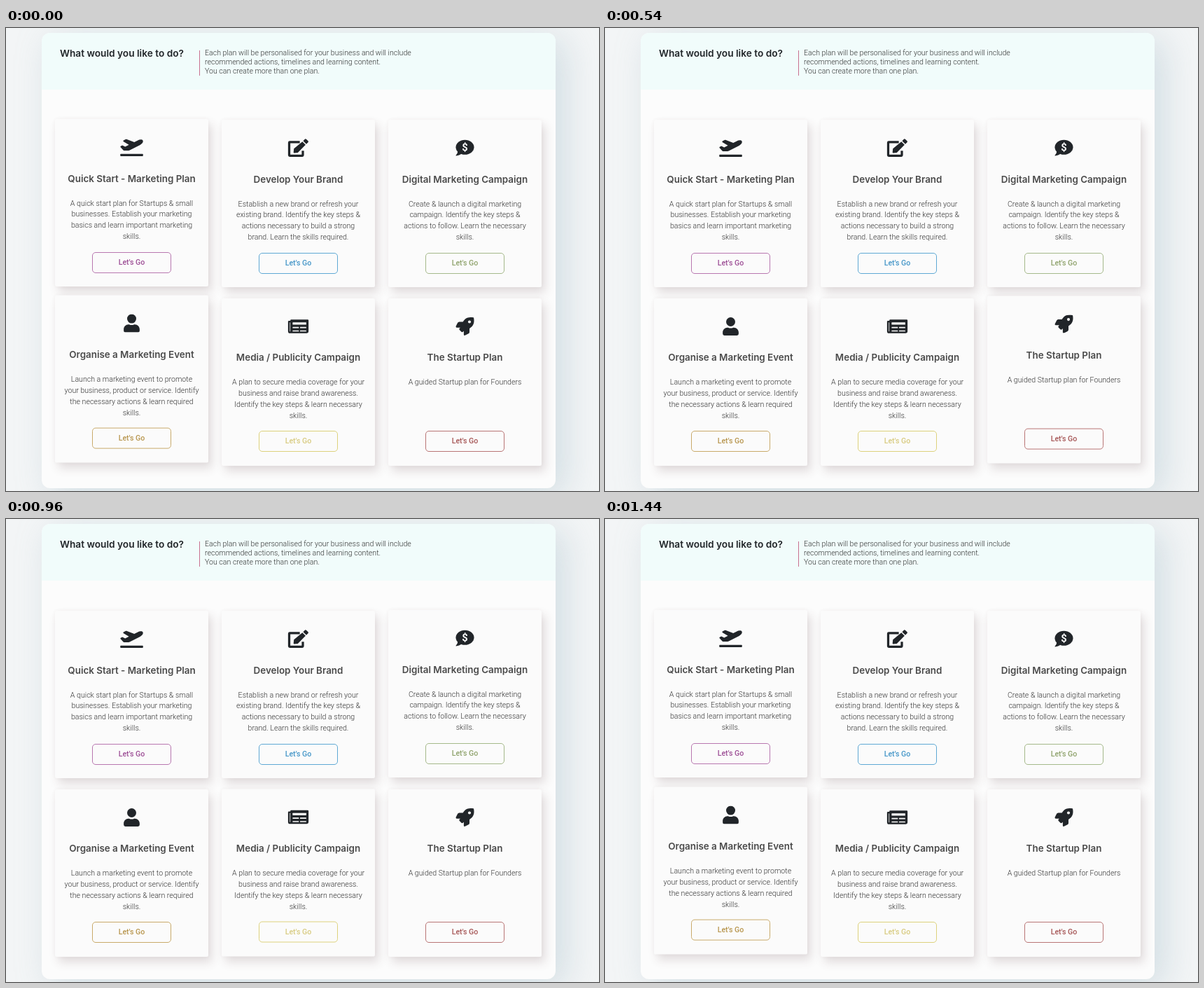
An HTML page that plays this animation: 847x661 px, repeating every 1.5 s.

```html
<!DOCTYPE html>
<html lang="en">
<head>
<meta charset="utf-8">
<title>Plan picker</title>
<style>
  html, body { margin: 0; width: 100%; height: 100%; overflow: hidden; }
  body { position: relative; background: #f3f5f6; font: 300 10.6px Roboto, sans-serif; color: #333; }
  .panel, .panel > *, .card, .card > * { position: absolute; box-sizing: border-box; }
  .panel { left: 51px; top: 7px; width: 734px; height: 650px; border-radius: 12px; background: #fcfcfc;
    box-shadow: 14px 10px 50px rgba(150, 180, 195, .36); }
  .top { width: 100%; height: 81px; border-radius: 12px 12px 0 0; background: #f1fcfb; }
  h1, h2 { margin: 0; font: 600 13.7px/18px Inter, sans-serif; white-space: nowrap; }
  h1 { left: 26px; top: 20px; color: #212529; }
  .intro { left: 225px; top: 25px; height: 36px; border-left: 1px solid #c8718f; }
  .intro p { margin: -3px 0 0 7px; line-height: 13.2px; white-space: pre; }
  .card { width: 219px; height: 239px; border-radius: 2px; background: #fbfbfb;
    box-shadow: 5px 8px 14px rgba(90, 55, 65, .16), 0 0 5px rgba(90, 55, 65, .05); }
  .card > * { left: 0; width: 100%; text-align: center; }
  .card svg { top: 27px; height: 26px; fill: #212529; }
  .card h2 { top: 75.5px; font-size: 13.4px; color: #4a4a4a; }
  .card p { top: 112.5px; margin: 0; line-height: 15.9px; white-space: pre; }
  .card b { left: 53px; top: 189.5px; width: 113px; height: 30px; border: 1px solid; border-radius: 5px;
    font-weight: 500; line-height: 28px; }
</style>
</head>
<body>
<div class="panel">
  <div class="top"></div>
  <h1>What would you like to do?</h1>
  <div class="intro"><p>Each plan will be personalised for your business and will include
recommended actions, timelines and learning content.
You can create more than one plan.</p></div>
</div>
<script>
const LOOP = 1500, STEP = 60, PAPER = '#fbfbfb';
const hole = (x, y, w, h) => `<rect x="${x}" y="${y}" width="${w}" height="${h}" rx="10" fill="${PAPER}"/>`;

const icons = {
  plane: [640, `<rect y="448" width="640" height="64" rx="16"/><path d="M80 341q10 11 24 11h131q16 0 30-7L556 197
    c60-30 95-85 80-122-20-40-90-35-144-8l-99 50L174 35q-9-5-18-1L90 67q-14 10-5 29l157 98-104 52-72-36q-8-4-16 0L10 230q-11 8-6 28z"/>`],
  edit: [576, `<path d="M330 96H48q-16 0-16 16V464q0 16 16 16H400q16 0 16-16V340" fill="none" stroke="#212529" stroke-width="64"/>
    <path d="M402 84l90 90L274 392l-100 11q-22 0-20-20l11-100zM424 62l48-49q20-18 40 0l51 51q18 20 0 40l-49 48z"/>`],
  comment: [512, `<ellipse cx="256" cy="240" rx="256" ry="208"/><path d="M60 340Q50 420 2 468q-6 12 6 12 90-2 150-50z"/>
    <text x="256" y="342" text-anchor="middle" font-size="290" font-weight="700" fill="${PAPER}">$</text>`],
  user: [448, `<circle cx="224" cy="128" r="128"/><path d="M314 288h-17q-73 33-146 0h-17C60 288 0 348 0 422v42
    q0 48 48 48h352q48 0 48-48v-42c0-74-60-134-134-134z"/>`],
  news: [576, `<path d="M552 64H88q-24 0-24 24v8H24q-24 0-24 24v272q0 56 56 56h472q48 0 48-48V88q0-24-24-24z"/>`
    + hole(48, 144, 16, 256) + hole(128, 144, 384, 64)
    + [272, 368].map(y => hole(128, y, 176, 32) + hole(336, y, 176, 32)).join('')],
  rocket: [512, `<path d="M505 19q-3-9-12-12C461 0 435 0 410 0 307 0 245 55 199 128H95q-28 2-43 26L3 253q-9 30 21 35h104l-23 22
    q-18 23 0 46l51 51q23 18 45 0l23-23v104q4 30 35 21l99-49q24-14 26-42V313c72-46 128-109 128-211 0-26 0-51-7-83z"/>
    <circle cx="384" cy="128" r="40" fill="${PAPER}"/>`]
};

// lift: [time, pixels] points, linear between them
const cards = [
  { icon: 'plane', title: 'Quick Start - Marketing Plan', ink: '#9d4f96', line: '#b877b0',
    text: 'A quick start plan for Startups & small\nbusinesses. Establish your marketing\nbasics and learn important marketing\nskills.',
    lift: [[0, 1], [180, 0], [1300, 0], [1440, 1], [1500, 1]] },
  { icon: 'edit', title: 'Develop Your Brand', ink: '#4596c8', line: '#5fa9d4',
    text: 'Establish a new brand or refresh your\nexisting brand. Identify the key steps &\nactions necessary to build a strong\nbrand. Learn the skills required.',
    lift: [[0, 0], [1500, 0]] },
  { icon: 'comment', title: 'Digital Marketing Campaign', ink: '#8fa36c', line: '#a5b98a',
    text: 'Create & launch a digital marketing\ncampaign. Identify the key steps &\nactions to follow. Learn the necessary\nskills.',
    lift: [[0, 0], [600, 0], [720, 1], [840, 1.8], [960, 1], [1080, 0], [1500, 0]] },
  { icon: 'user', title: 'Organise a Marketing Event', ink: '#b8964e', line: '#c9aa6a',
    text: 'Launch a marketing event to promote\nyour business, product or service. Identify\nthe necessary actions & learn required\nskills.',
    lift: [[0, 4.4], [60, 4.2], [240, 0], [1080, 0], [1260, 1.7], [1440, 3.4], [1500, 4.4]] },
  { icon: 'news', title: 'Media / Publicity Campaign', ink: '#d8cb80', line: '#ddd27c',
    text: 'A plan to secure media coverage for your\nbusiness and raise brand awareness.\nIdentify the key steps & learn necessary\nskills.',
    lift: [[0, 0], [60, 0], [240, 2.8], [300, 2.5], [480, 0], [900, 0], [960, .5], [1110, 2], [1260, .7], [1380, 0], [1500, 0]] },
  { icon: 'rocket', title: 'The Startup Plan', ink: '#a65656', line: '#b97575',
    text: 'A guided Startup plan for Founders',
    lift: [[0, 0], [300, 0], [480, 3.7], [540, 3.4], [690, 0], [1500, 0]] }
];

const escape = s => s.replace(/&/g, '&amp;');
cards.forEach((card, i) => {
  const [width, art] = icons[card.icon];
  const el = card.el = document.createElement('div');
  el.className = 'card';
  el.style.left = 70 + i % 3 * 238 + 'px';
  el.style.top = (i < 3 ? 131 : 385.5) + 'px';
  el.innerHTML = `<svg viewBox="0 0 ${width} 512">${art}</svg><h2>${card.title}</h2><p>${escape(card.text)}</p>
    <b style="color:${card.ink};border-color:${card.line}">Let's Go</b>`;
  document.body.append(el);
});

function liftAt(points, t) {
  const i = points.findIndex(p => p[0] > t);
  const [t0, a] = points[i - 1], [t1, b] = points[i];
  return a + (b - a) * (t - t0) / (t1 - t0);
}

function draw() {
  const t = Math.floor(performance.now() % LOOP / STEP) * STEP;
  for (const { el, lift } of cards) el.style.transform = `translateY(${-liftAt(lift, t)}px)`;
  requestAnimationFrame(draw);
}
draw();
</script>
</body>
</html>
```
